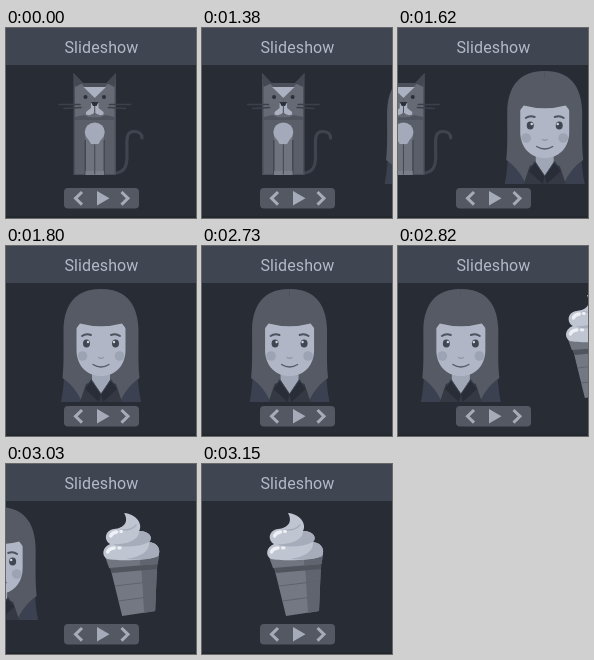
These frames come from a looping animation (190x190 px, 4050 ms). An HTML page with a canvas:

```html
<!DOCTYPE html>
<html lang="en">
<head>
<meta charset="utf-8">
<title>Slideshow</title>
<style>
html, body { margin: 0; width: 100%; height: 100%; overflow: hidden; background: #282c34; }
canvas { position: absolute; left: 0; top: 0; display: block; }
h1 {
  position: absolute; left: 0; top: 0; width: 190px; height: 37px; margin: 0;
  background: #404552; color: #b3b9c7; text-align: center;
  font: 400 16px/39px Roboto, Arial, sans-serif;
  letter-spacing: 0.1px; text-indent: 0.9px;
}
</style>
</head>
<body>
<canvas id="stage" width="190" height="190"></canvas>
<h1>Slideshow</h1>
<script>
const ctx = document.getElementById('stage').getContext('2d');
const LOOP = 4050, STEP = 30, STEPS = 15, GAP = 135;
const LIGHT = '#abb1c0', PALE = '#bfc5d1', DARK = '#3c4049', INK = '#2b2f38', HAIR = '#555a64';

function fill(color, d) {
  ctx.fillStyle = color;
  ctx.fill(new Path2D(d));
}

function line(color, width, d, cap = 'round') {
  ctx.strokeStyle = color;
  ctx.lineWidth = width;
  ctx.lineCap = cap;
  ctx.stroke(new Path2D(d));
}

function oval(color, x, y, rx, ry = rx) {
  ctx.fillStyle = color;
  ctx.beginPath();
  ctx.ellipse(x, y, rx, ry, 0, 0, Math.PI * 2);
  ctx.fill();
}

// Draws the same part on both sides of a vertical axis.
function mirror(axis, part) {
  part();
  ctx.save();
  ctx.translate(axis * 2, 0);
  ctx.scale(-1, 1);
  part();
  ctx.restore();
}

function cat() {
  line('#40444e', 3.2, 'M108 145C118 145 121 139 121 128C121 113 119 103.5 128 103.5C133 103.5 136 106 136 110');
  fill('#4b4f59', 'M67.5 45L77 55H100.5L110 45V147H67.5Z');
  mirror(88.75, () => {
    fill('#656a74', 'M69 56H76L83 64L88.75 70V89H69Z');
    fill('#595e68', 'M69 89H88.75V146H69Z');
    fill('#444852', 'M67.5 45L77 55L69 59Z');
    fill('#6e737e', 'M79.5 108H88.75V146H79.5Z');
    fill('#444852', 'M78.5 112H80V146H78.5Z');
    fill('#797e89', 'M79.5 143H88.75V147H79.5Z');
    oval(INK, 79.5, 69, 2, 1.9);
    fill(LIGHT, 'M88.75 75H85V80L80 84V86.5Q85 89 88.75 84Z');
    line(DARK, 1.6, 'M53 76.5H74M58 80.5L75 79.5');
  });
  fill(LIGHT, 'M77.5 59H100L88.75 70Z');
  fill(INK, 'M85 74H92.5L90.5 78H87Z');
  line('#4b4f59', 1, 'M88.75 78V84');
  fill('#50545e', 'M69 89L78 87Q88.75 93 99.5 87L108.5 89V92H69Z');
  oval('#a4aab9', 88.75, 104, 10, 9.5);
  fill('#a4aab9', 'M81 109H96.5L92.5 116H85Z');
  line('#444852', 1, 'M88.75 117V146');
}

function girl() {
  fill('#3b4150', 'M95 43C70 43 59 59 58.5 82C58 110 60 132 55 156H135C130 132 132 110 131.5 82C131 59 120 43 95 43Z');
  mirror(95, () => {
    fill(HAIR, 'M95 43C70 43 58 58 57.5 84C57.5 104 58 118 56.5 132C64 137 71 145 75 154L84 134L95 128Z');
  });
  fill('#343944', 'M74 156L80 138L95 132L110 138L116 156Z');
  fill('#9fa6b5', 'M86 124H104V137L95 148L86 137Z');
  mirror(95, () => {
    fill('#292d37', 'M86 134L95 148L93 156L79 143Z');
    line('#434854', 1, 'M86 135L95 148');
  });
  fill('#b0b6c5', 'M70.5 76H119.5V104C119.5 120 109 130 95 130C81 130 70.5 120 70.5 104Z');
  mirror(95, () => {
    oval('#9ca3b2', 76.5, 110, 4.8);
    line('#4d535f', 1.9, 'M76 90Q80 87 85 89');
    oval('#414752', 80.5, 97.5, 3.5, 4);
    oval('#d2d7e1', 82, 96, 1.2);
  });
  line('#8f96a5', 1.3, 'M92.5 111.5Q95 113 97.5 111.5');
  line('#565c69', 1.4, 'M87 118.5Q95 123.5 103 118.5');
  fill(HAIR, 'M95 50C78 50 70 64 69 84L74 77.5Q95 83 116 77.5L121 84C120 64 112 50 95 50Z');
}

function iceCream() {
  fill('#737882', 'M72 103L119 99L117 147L84 152Z');
  fill('#5f646e', 'M103 100L119 99L117 147L106 149Z');
  fill('#4f545d', 'M71 103L119.5 99L119 105L74 109Z');
  line('#5e636d', 1.2, 'M77 122L118 117M80.5 137L117.5 132', 'butt');
  fill('#70757f', 'M67 93L121 90L119.5 100L71 104Z');
  fill('#5f646e', 'M102 91L121 90L119.5 100L102 101.5Z');
  fill(PALE, 'M86 49C98 50 105 60 101 67C112 67 115 74 111 78C120 79 123 86 120 92C109 97 79 97 69 95C63 92 64 83 72 80C65 76 67 66 76 65C86 64 91 58 86 49Z');
  fill('#a6acba', 'M111 78C120 79 123 86 120 92C112 96 99 96 88 95C103 93 112 87 111 78Z');
  fill('#a6acba', 'M101 67C112 67 115 74 111 78C101 83 86 84 75 80.5C90 80 101 76 101 67Z');
  line('#a6acba', 1.2, 'M82 66Q93 67 98 61');
  line('#edf0f5', 3.4, 'M69.5 88Q71 84.5 76 84M72.5 72Q74 68.5 78.5 68');
  line('#edf0f5', 2.8, 'M80.5 84H82M82.5 67.5H83.5');
}

function controls() {
  ctx.fillStyle = '#535862';
  ctx.beginPath();
  ctx.roundRect(58, 160, 75, 20.5, 4);
  ctx.fill();
  fill('#a5abb9', 'M91 163L103.5 170.3L91 177.5Z');
  ctx.lineJoin = 'miter';
  line('#a5abb9', 3, 'M76 164L69.5 170.3L76 176.6M115.5 164L122 170.3L115.5 176.6', 'butt');
}

// Gentle ease in and out, held in 30 ms steps.
function progress(t, start) {
  const k = Math.floor((t - start) / STEP) + 1;
  const x = Math.min(1, Math.max(0, k / STEPS));
  return x - 0.18 * Math.sin(2 * Math.PI * x) / (2 * Math.PI);
}

function slide(draw, x) {
  ctx.save();
  ctx.translate(x, 0);
  draw();
  ctx.restore();
}

function render(t) {
  const a = progress(t, 1380), b = progress(t, 2730);
  ctx.fillStyle = '#282c34';
  ctx.fillRect(0, 0, 190, 190);
  if (a < 1) slide(cat, -GAP * a);
  if (a > 0 && b < 1) slide(girl, GAP * (1 - a - b));
  if (b > 0) slide(iceCream, GAP * (1 - b));
  controls();
  ctx.fillStyle = '#23272e';
  ctx.fillRect(0, 188, 190, 2);
}

const begin = performance.now();
function tick() {
  render((performance.now() - begin) % LOOP);
  requestAnimationFrame(tick);
}
tick();
</script>
</body>
</html>
```
